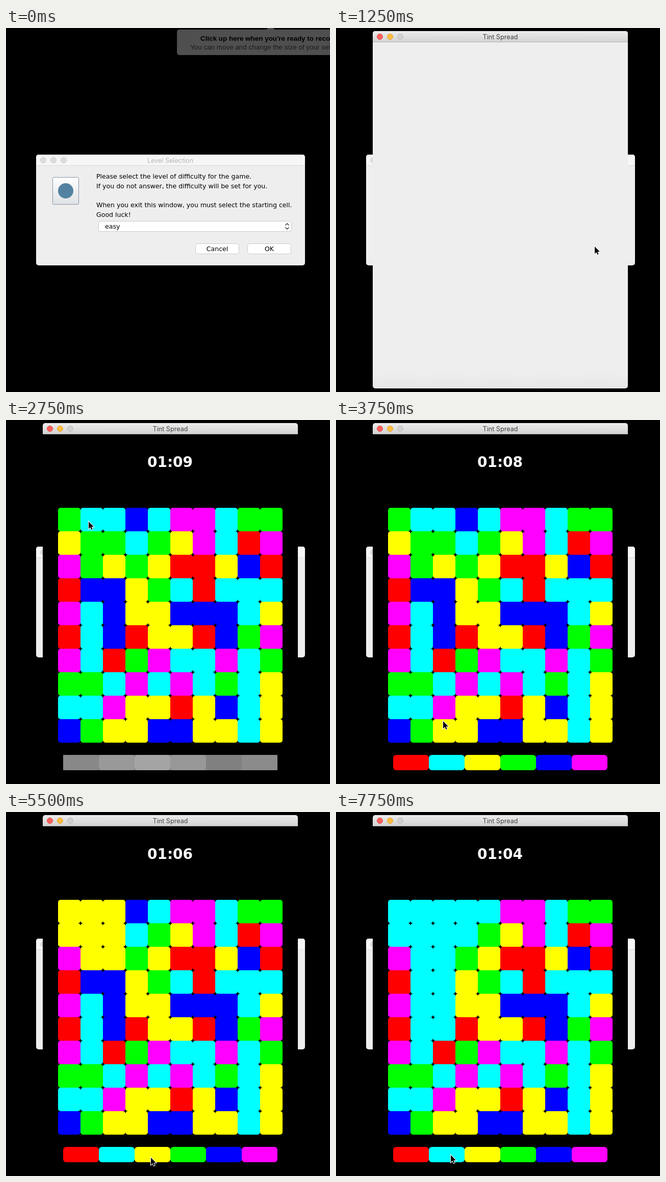
Animation, 635 px wide and 713 px high, one loop 8000 ms. Source, as an HTML page with a canvas:

```html
<!DOCTYPE html>
<html lang="en">
<head>
<meta charset="utf-8">
<title>Tint Spread</title>
<style>
  html, body { margin: 0; width: 100%; height: 100%; overflow: hidden; background: #000; }
  canvas { display: block; }
</style>
</head>
<body>
<canvas id="stage" width="635" height="713"></canvas>
<script>
const ctx = document.getElementById('stage').getContext('2d');
const LOOP = 8000, STEP = 250;
const COLS = 10;
const COLORS = { R: '#f00', C: '#0ff', Y: '#ff0', G: '#0f0', B: '#00f', M: '#f0f' };
const DISABLED = ['#888', '#999', '#a4a4a4', '#989898', '#808080', '#8b8b8b'];
const START_BOARD =
  'GCCBCMMCGG' + 'YGGCGYMCRM' + 'MGYGYRRYBR' + 'RBBYGCRCCC' + 'MCBYYBBBCY' +
  'RCBRYYRBGM' + 'MCRGMCCMCG' + 'GGCMCMCGCY' + 'CCMYYRYBCY' + 'BGYYBBYYCY';
const START_CELL = 1;
const MOVES = [[4750, 'G'], [5500, 'Y'], [6500, 'B'], [7750, 'C']];

// time, x, y of the pointer tip
const POINTER = [
  [250, 516, 40], [1000, 507, 428], [1500, 507, 428], [2750, 162, 199], [3250, 162, 199],
  [3750, 210, 590], [4500, 338, 669], [4750, 338, 669], [5250, 284, 677], [5750, 284, 677],
  [6250, 439, 674], [6750, 439, 674], [7500, 225, 672], [8000, 225, 672]
];
const ARROW = new Path2D('M0 0V14.2L3.3 11.1 5.4 15.9 7.6 15 5.5 10.2H10Z');

const UI = '"DejaVu Sans", sans-serif';
const TITLE_FONT = '12.6px Inter, sans-serif';
const HINT_FONT = '13.45px "Liberation Sans", Arial, sans-serif';

function box(x, y, w, h, radius, fill, stroke) {
  ctx.beginPath();
  ctx.roundRect(x, y, w, h, radius);
  ctx.fillStyle = fill;
  ctx.fill();
  if (stroke) {
    ctx.strokeStyle = stroke;
    ctx.stroke();
  }
}

function disc(x, y, r, fill, stroke) {
  box(x - r, y - r, 2 * r, 2 * r, r, fill, stroke);
}

function text(string, x, y, font, color = '#000', align = 'left') {
  ctx.font = font;
  ctx.fillStyle = color;
  ctx.textAlign = align;
  ctx.fillText(string, x, y);
}

function fade(y0, y1, from, to) {
  const gradient = ctx.createLinearGradient(0, y0, 0, y1);
  gradient.addColorStop(0, from);
  gradient.addColorStop(1, to);
  return gradient;
}

function drawHint() {
  box(335, 3, 366, 50, 5, '#4f4f4f');
  ctx.beginPath();
  ctx.moveTo(509, 3.5);
  ctx.lineTo(514, 0);
  ctx.lineTo(523, 0);
  ctx.lineTo(528, 3.5);
  ctx.fill();
  text("Click up here when you're ready to record.", 381, 25, 'bold ' + HINT_FONT);
  text('You can move and change the size of your selection.', 361, 42, HINT_FONT, '#1a1a1a');
}

function drawButton(label, x) {
  box(x + .5, 422.5, 85, 20, 4, '#fff', '#cacaca');
  text(label, x + 43, 437, '12.55px ' + UI, '#000', 'center');
}

function drawDialog() {
  box(59, 248, 527, 217, 5, '#eee');
  box(59, 248, 527, 21, [5, 5, 0, 0], '#f6f6f6');
  box(59, 269, 527, 1, 0, '#dadada');
  for (const x of [73, 93, 113]) disc(x, 259, 5.5, '#dcdcdc', '#d0d0d0');
  text('Level Selection', 322, 264, TITLE_FONT, '#b4b4b4', 'center');

  box(91.5, 292.5, 51, 53, 2, fade(292, 346, '#fff', '#dfe2e5'), '#8294a5');
  disc(117, 319, 15, '#5382a1');

  const font = '12.55px ' + UI;
  text('Please select the level of difficulty for the game.', 177, 295, font);
  text('If you do not answer, the difficulty will be set for you.', 177, 314, font);
  text('When you exit this window, you must select the starting cell.', 177, 351, font);
  text('Good luck!', 177, 370, font);

  box(181.5, 378.5, 378, 20, 4, '#fff', '#cacaca');
  text('easy', 194, 393, font);
  ctx.strokeStyle = '#333';
  ctx.lineWidth = 1.4;
  ctx.stroke(new Path2D('M547.5 386.5l3.5-3.5 3.5 3.5M547.5 390.5l3.5 3.5 3.5-3.5'));
  ctx.lineWidth = 1;
  drawButton('Cancel', 371);
  drawButton('OK', 473);
}

function drawWindow(content) {
  box(72, 6, 500, 700, 5, content);
  box(72, 6, 500, 22, [5, 5, 0, 0], fade(6, 28, '#ececec', '#d2d2d2'));
  box(72, 27, 500, 1, 0, '#b4b4b4');
  disc(86, 17, 5.5, '#fc605b', '#e2504a');
  disc(106, 17, 5.5, '#fdbc40', '#e0a236');
  disc(126, 17, 5.5, '#d0d0d0', '#bcbcbc');
  text('Tint Spread', 322, 22, TITLE_FONT, '#444', 'center');
}

function flood(board, color) {
  const old = board[START_CELL];
  const pending = [START_CELL];
  while (pending.length) {
    const i = pending.pop();
    if (board[i] !== old) continue;
    board[i] = color;
    if (i % COLS > 0) pending.push(i - 1);
    if (i % COLS < COLS - 1) pending.push(i + 1);
    pending.push(i - COLS, i + COLS);
  }
}

function drawGame(t) {
  const seconds = 10 - Math.floor((t - 1500) / 1000);
  text('01:' + String(seconds).padStart(2, '0'), 321.5, 92, 'bold 28px ' + UI, '#fff', 'center');

  const board = [...START_BOARD];
  for (const [time, color] of MOVES) if (t >= time) flood(board, color);
  board.forEach((color, i) =>
    box(102 + i % COLS * 44, 172 + Math.floor(i / COLS) * 46, 44, 46, 5, COLORS[color]));

  const enabled = t >= 3000;
  if (!enabled) box(112, 656, 420, 30, 0, '#868686');
  Object.values(COLORS).forEach((color, i) =>
    box(112 + i * 70, 656, 70, 30, 6, enabled ? color : DISABLED[i]));
}

function drawPointer(t) {
  const next = POINTER.findIndex(key => key[0] > t);
  const [t0, x0, y0] = POINTER[next - 1];
  const [t1, x1, y1] = POINTER[next];
  const p = (t - t0) / (t1 - t0);
  const eased = p * p * (3 - 2 * p);
  ctx.save();
  ctx.translate(x0 + (x1 - x0) * eased, y0 + (y1 - y0) * eased);
  ctx.strokeStyle = '#fff';
  ctx.lineWidth = 2;
  ctx.stroke(ARROW);
  ctx.fillStyle = '#000';
  ctx.fill(ARROW);
  ctx.restore();
}

function draw(now) {
  const t = Math.floor(now % LOOP / STEP) * STEP;
  ctx.fillStyle = '#000';
  ctx.fillRect(0, 0, 635, 713);
  if (t < 250) drawHint();
  drawDialog();
  if (t >= 1500) {
    drawWindow('#000');
    drawGame(t);
  } else if (t >= 1250) {
    drawWindow(fade(675, 706, '#eee', '#e6e6e6'));
  }
  if (t >= 250) drawPointer(t);
}

const start = performance.now();
function tick() {
  draw(performance.now() - start);
  requestAnimationFrame(tick);
}
tick();
</script>
</body>
</html>
```
